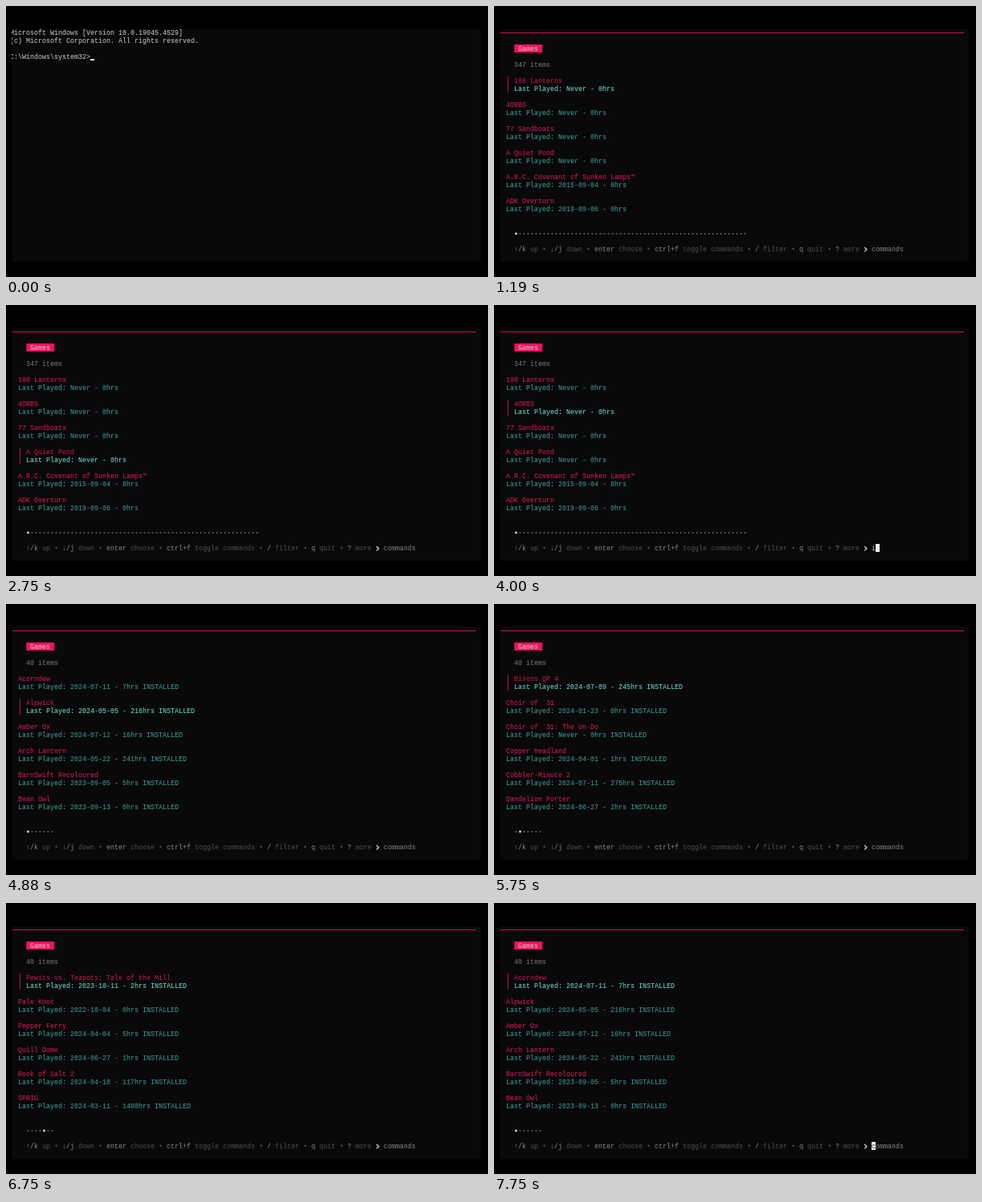
Animation of 600 by 338 pixels, one loop 8 s. Source, as an HTML page with a canvas:

```html
<!DOCTYPE html>
<html lang="en">
<head>
<meta charset="utf-8">
<title>Terminal game list</title>
<style>
  html, body { margin: 0; width: 100%; height: 100%; overflow: hidden; background: #000; }
  canvas { display: block; width: 100%; height: 100%; }
</style>
</head>
<body>
<canvas id="stage" width="600" height="338"></canvas>
<script>
const ctx = document.getElementById('stage').getContext('2d');
const LOOP = 8000;
const CELL = 5;
const FONT = '8.3333px "Liberation Mono", "DejaVu Sans Mono", monospace';
const PER_PAGE = 6;

const C = {
  panel: '#0a090a', shell: '#d0d0d0', cursor: '#f2f2f2',
  rule: '#c4125a', badge: '#e8155f', badgeText: '#f3c6d5',
  title: '#e01a62', titleOn: '#cc1955', bar: '#a5174b',
  desc: '#44a399', descOn: '#74e6da',
  count: '#7c7c7c', dot: '#606060', dotOn: '#dddddd',
  key: '#888888', hint: '#505050', input: '#858585', chevron: '#dddddd'
};

// Each entry: title | last played | hours
const parse = (text, tail) => text.trim().split('\n').map(line => {
  const [title, date, hours] = line.split('|');
  return { title, desc: `Last Played: ${date} - ${hours}hrs${tail}` };
});

const library = parse(`
108 Lanterns|Never|0
4ORBS|Never|0
77 Sandboats|Never|0
A Quiet Pond|Never|0
A.R.C. Covenant of Sunken Lamps™|2015-09-04|8
ADK Overturn|2019-09-06|0`, '');

const installed = parse(`
Acorndew|2024-07-11|7
Alpwick|2024-05-05|216
Amber Ox|2024-07-12|16
Arch Lantern|2024-05-22|241
BarnSwift Recoloured|2023-09-05|5
Bean Owl|2023-09-13|0
Bisons QP 4|2024-07-09|245
Choir of \`31|2024-01-23|0
Choir of \`31: The Un-Do|Never|0
Copper Headland|2024-04-01|1
Cobbler-Minute 2|2024-07-11|275
Dandelion Porter|2024-06-27|2
Dune Kettle|2024-02-18|12
Ember Parcel|2023-11-30|3
Fennel Road|2024-03-09|41
Glass Orchard|Never|0
Gravel Choir 3|2024-06-02|88
Hollow Biscuit|2023-12-14|6
Inkwell Harbor|2024-01-05|9
Juniper Dash|2024-05-17|23
Kite Foundry|2023-10-21|2
Lumber Moth|2024-04-29|64
Marble Ferry|Never|0
Nettle Squad|2024-06-15|130
Pewits vs. Teapots: Tale of the Mill|2023-10-11|2
Pale Knot|2022-10-04|0
Pepper Ferry|2024-04-04|5
Quill Dome|2024-06-27|1
Rook of Salt 2|2024-04-18|117
SPRIG|2024-03-11|1400
Saddle Comet|2024-02-03|14
Thimble Quarry|2023-08-19|1
Tin Meadow|2024-05-30|52
Turnip Signal|Never|0
Umber Vault|2024-01-16|7
Velvet Anvil|2024-07-02|33
Walnut Drift|2023-09-27|4
Willow Circuit|2024-03-22|19
Yarrow Keep|2024-06-08|76
Zinc Parade|2023-12-01|0`, ' INSTALLED');

// Keyframes: [start ms, value]; the last one reached holds.
const at = (track, t) => track.reduce((v, [start, next]) => t >= start ? next : v, track[0][1]);

const selection = [
  [0, 0], [1940, 1], [2130, 2], [2310, 3], [2500, 4],
  [2750, 3], [2940, 2], [3190, 1],
  [4310, 0], [4880, 1], [5060, 2], [5190, 3], [5380, 4], [5500, 5], [5690, 0]
];
const paging = [
  [0, 0], [5690, 1], [5880, 2], [6060, 3], [6250, 4], [6380, 5], [6500, 6],
  [6630, 5], [6750, 4], [6940, 3], [7130, 2], [7310, 1], [7500, 0]
];
// null means the command input is not focused
const typing = [[0, null], [3380, ''], [4000, 'i'], [4130, 'installed'], [4310, null], [7690, '']];

const COMMAND = 'gamelist';
const TYPE_START = 60, TYPE_STEP = 63, ENTER = 690, CLEAR = 810, LIST_START = 1190;

function rect(x, y, w, h, color) {
  ctx.fillStyle = color;
  ctx.fillRect(x, y, w, h);
}

// y is the middle of a 10 px text row
function write(text, x, y, color) {
  ctx.fillStyle = color;
  ctx.fillText(text, x, y + 3);
  return x + text.length * CELL;
}

function drawShell(t) {
  if (t >= CLEAR) return;
  const x = 5;
  write('Microsoft Windows [Version 10.0.19045.4529]', x, 33, C.shell);
  write('(c) Microsoft Corporation. All rights reserved.', x, 43, C.shell);
  const count = t < TYPE_START ? 0 : Math.floor((t - TYPE_START) / TYPE_STEP) + 1;
  const end = write('C:\\Windows\\system32>' + COMMAND.slice(0, count), x, 63, C.shell);
  if (t < ENTER) rect(end, 66, CELL, 2, C.cursor);
  else rect(8, 76, CELL - 2, 2, C.cursor);
}

function drawItem(item, row, active) {
  const y = 93 + row * 30;
  const x = active ? 25 : 15;
  if (active) rect(17, y - 5, 1, 20, C.bar);
  write(item.title, x, y, active ? C.titleOn : C.title);
  write(item.desc, x, y + 10, active ? C.descOn : C.desc);
}

function drawDots(total, page) {
  for (let i = 0; i < total; i++) {
    ctx.fillStyle = i === page ? C.dotOn : C.dot;
    ctx.beginPath();
    ctx.arc(27.5 + i * CELL, 284, i === page ? 1.4 : 1.1, 0, Math.PI * 2);
    ctx.fill();
  }
}

function drawHelp(value) {
  const y = 303;
  const hints = [
    ['↑/k', 'up'], ['↓/j', 'down'], ['enter', 'choose'],
    ['ctrl+f', 'toggle commands'], ['/', 'filter'], ['q', 'quit'], ['?', 'more']
  ];
  let x = 25;
  hints.forEach(([key, label], i) => {
    if (i) x = write('•', x + CELL, y, C.hint) + CELL;
    x = write(key, x, y, C.key) + CELL;
    x = write(label, x, y, C.hint);
  });

  ctx.strokeStyle = C.chevron;
  ctx.lineWidth = 1.2;
  ctx.beginPath();
  ctx.moveTo(461.2, 301);
  ctx.lineTo(464, 303.7);
  ctx.lineTo(461.2, 306.4);
  ctx.stroke();

  const inputX = 470;
  if (value) {
    const end = write(value, inputX, y, C.shell);
    rect(end, 298, CELL, 10, C.cursor);
    return;
  }
  write('commands', inputX, y, C.input);
  if (value === '') {
    rect(inputX, 298, CELL, 10, C.cursor);
    write('c', inputX, y, '#333333');
  }
}

function drawList(t) {
  const filtered = t >= 4310;
  const items = filtered ? installed : library;
  const total = filtered ? installed.length : 347;
  const page = at(paging, t);
  const first = page * PER_PAGE;
  const active = at(selection, t);

  rect(8, 33, 577, 1, C.rule);
  rect(25.3, 48, 34.9, 10, C.badge);
  write('Games', 30, 53, C.badgeText);
  write(`${total} items`, 25, 73, C.count);
  items.slice(first, first + PER_PAGE).forEach((item, i) => drawItem(item, i, i === active));
  drawDots(Math.ceil(total / PER_PAGE), page);
  drawHelp(at(typing, t));
}

function draw(t) {
  rect(0, 0, 600, 338, '#000000');
  rect(8, 29, 583, 290, C.panel);
  ctx.save();
  ctx.beginPath();
  ctx.rect(7, 28, 584, 291);
  ctx.clip();
  ctx.font = FONT;
  ctx.textBaseline = 'alphabetic';
  if (t < LIST_START) drawShell(t);
  else drawList(t);
  ctx.restore();
}

const start = performance.now();
function frame() {
  draw((performance.now() - start) % LOOP);
  requestAnimationFrame(frame);
}
frame();
</script>
</body>
</html>
```
